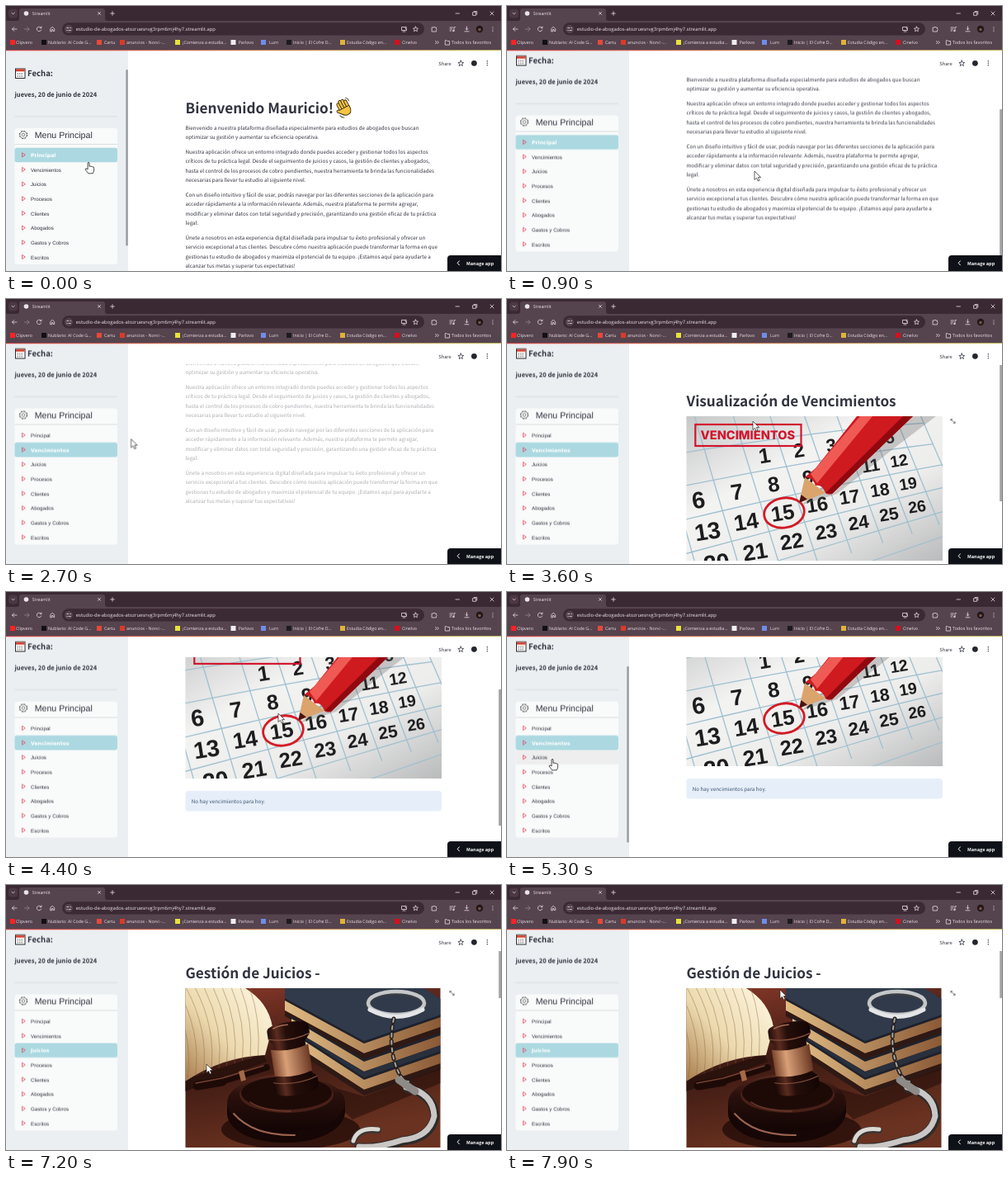
These frames come from a looping animation (600x321 px, 8 s). An HTML page:

```html
<!DOCTYPE html>
<html lang="es">
<head>
<meta charset="utf-8">
<title>Estudio de abogados</title>
<style>
html, body { margin: 0; width: 100%; height: 100%; overflow: hidden; background: #fff; }
svg { display: block; width: 100vw; height: 100vh; }
text { text-rendering: geometricPrecision; white-space: pre; }
.sans { font-family: "Noto Sans CJK JP", "Noto Sans CJK SC", "Noto Sans", sans-serif; fill: #31333f; font-size: 6.29px; }
.b { font-weight: 700; }
.h1 { font-size: 17.2px; font-weight: 700; }
.ui { font-family: "Open Sans", sans-serif; fill: #eee4e9; font-size: 5.25px; }
.menu { font-family: "Liberation Sans", Arial, sans-serif; fill: #31333f; font-size: 6.2px; }
.picked { font: 700 6.15px "DejaVu Sans", sans-serif; fill: #fff; }
.line { fill: none; stroke-linecap: round; stroke-linejoin: round; }

.move, .show { animation-duration: 8s; animation-iteration-count: infinite; animation-timing-function: linear; }
.show { animation-timing-function: step-end; }

#side { animation-name: side; }
@keyframes side { 0%, 1% { transform: none } 4%, 100% { transform: translateY(-15.5px) } }
#sideThumb { animation-name: sideThumb; }
@keyframes sideThumb { 0%, 1% { transform: none } 4%, 100% { transform: translateY(13px) } }
#sideBar { animation-name: sideBar; }
@keyframes sideBar { 0% { opacity: 1 } 5% { opacity: 0 } 15.5% { opacity: 1 } 32% { opacity: 0 } 61% { opacity: 1 } 74.5%, 100% { opacity: 0 } }

#sel0 { animation-name: sel0; }
@keyframes sel0 { 0% { opacity: 1 } 28%, 100% { opacity: 0 } }
#sel1 { animation-name: sel1; }
@keyframes sel1 { 0% { opacity: 0 } 28% { opacity: 1 } 70.5%, 100% { opacity: 0 } }
#sel2 { animation-name: sel2; }
@keyframes sel2 { 0% { opacity: 0 } 70.5%, 100% { opacity: 1 } }
#hover1 { animation-name: hover1; }
@keyframes hover1 { 0% { opacity: 0 } 23.5% { opacity: 1 } 28%, 100% { opacity: 0 } }
#hover2 { animation-name: hover2; }
@keyframes hover2 { 0% { opacity: 0 } 17.5% { opacity: 1 } 23.5% { opacity: 0 } 63.5% { opacity: 1 } 70.5%, 100% { opacity: 0 } }

#home { animation-name: home; }
@keyframes home { 0%, 29% { opacity: 1 } 32%, 34.99% { opacity: .4 } 35%, 100% { opacity: 0 } }
#homeScroll { animation-name: homeScroll; }
@keyframes homeScroll { 0%, 7.5% { transform: none } 12%, 100% { transform: translateY(-70px) } }
#due { animation-name: due; }
@keyframes due { 0%, 34.99% { opacity: 0 } 35%, 71.5% { opacity: 1 } 74%, 74.99% { opacity: .4 } 75%, 100% { opacity: 0 } }
#dueScroll { animation-name: dueScroll; }
@keyframes dueScroll { 0%, 48% { transform: none } 55% { transform: translateY(-91px) } 57%, 100% { transform: translateY(-106px) } }
#trial { animation-name: trial; }
@keyframes trial { 0% { opacity: 0 } 75%, 100% { opacity: 1 } }
#trialScroll { animation-name: trialScroll; }
@keyframes trialScroll { 0%, 80% { transform: none } 84%, 86.5% { transform: translateY(-88px) } 90%, 100% { transform: none } }

#homeBar { animation-name: homeBar; }
@keyframes homeBar { 0% { opacity: 0 } 6% { opacity: 1 } 15%, 100% { opacity: 0 } }
#homeThumb { animation-name: homeThumb; }
@keyframes homeThumb { 0%, 7.5% { transform: none } 12%, 100% { transform: translateY(54px) } }
#dueBar { animation-name: dueBar; }
@keyframes dueBar { 0% { opacity: 0 } 35% { opacity: 1 } 61%, 100% { opacity: 0 } }
#dueThumb { animation-name: dueThumb; }
@keyframes dueThumb { 0%, 48% { transform: none } 55% { transform: translateY(38px) } 57%, 100% { transform: translateY(44px) } }
#trialBar { animation-name: trialBar; }
@keyframes trialBar { 0% { opacity: 0 } 76%, 100% { opacity: 1 } }
#trialThumb { transform-origin: 0 80px; animation-name: trialThumb; }
@keyframes trialThumb { 0%, 80% { transform: scaleY(1.4) } 84%, 86.5% { transform: translateY(3px) scaleY(1.4) } 90%, 100% { transform: none } }
#dueZoom { animation-name: dueZoom; }
@keyframes dueZoom { 0% { opacity: 0 } 41.5% { opacity: 1 } 60%, 100% { opacity: 0 } }
#trialZoom { animation-name: trialZoom; }
@keyframes trialZoom { 0% { opacity: 0 } 78%, 100% { opacity: 1 } }

#cursor { animation-name: cursor; }
@keyframes cursor {
  0%, 3.5% { transform: translate(100px, 189px) }
  7.5%, 12% { transform: translate(300px, 200px) }
  17.5% { transform: translate(101px, 197px) }
  21.25% { transform: translate(96px, 189px) }
  25%, 29.5% { transform: translate(70px, 181px) }
  41% { transform: translate(290px, 150px) }
  45%, 48% { transform: translate(298px, 148px) }
  52%, 58.5% { transform: translate(330px, 147px) }
  65% { transform: translate(60px, 199px) }
  66.25%, 72% { transform: translate(55px, 202px) }
  79%, 91% { transform: translate(243px, 217px) }
  98.75%, 100% { transform: translate(331px, 127px) }
}
#hand { animation-name: hand; }
@keyframes hand { 0% { opacity: 1 } 4.4% { opacity: 0 } 16.7% { opacity: 1 } 31.5% { opacity: 0 } 63% { opacity: 1 } 73.5%, 100% { opacity: 0 } }
#arrow { animation-name: arrow; }
@keyframes arrow { 0% { opacity: 0 } 4.4% { opacity: 1 } 16.7% { opacity: 0 } 31.5% { opacity: 1 } 63% { opacity: 0 } 73.5%, 100% { opacity: 1 } }
</style>
</head>
<body>
<svg viewBox="0 0 600 321" preserveAspectRatio="none">
  <defs>
    <clipPath id="mainClip"><rect x="148" y="79.5" width="452" height="242"/></clipPath>
    <clipPath id="calClip"><rect x="217.5" y="142" width="310.5" height="175"/></clipPath>
    <clipPath id="lawClip"><rect x="217.5" y="125" width="309" height="193"/></clipPath>
    <linearGradient id="paper" x2="1" y2="1">
      <stop stop-color="#c6c7c8"/><stop offset=".35" stop-color="#f3f3f2"/>
      <stop offset=".65" stop-color="#ededec"/><stop offset="1" stop-color="#b9babb"/>
    </linearGradient>
    <linearGradient id="desk" x2=".3" y2="1">
      <stop stop-color="#8a3a2a"/><stop offset=".5" stop-color="#3d1a13"/><stop offset="1" stop-color="#6a3220"/>
    </linearGradient>
    <linearGradient id="leaf" y1="1" x2="1" y2="0">
      <stop stop-color="#a87c4c"/><stop offset=".45" stop-color="#ecd9ae"/><stop offset="1" stop-color="#fff8e4"/>
    </linearGradient>
    <linearGradient id="bookEdge"><stop stop-color="#e0bb84"/><stop offset="1" stop-color="#8a5a36"/></linearGradient>
    <linearGradient id="wood" x2="0" y2="1">
      <stop stop-color="#5a2a1e"/><stop offset=".35" stop-color="#29100c"/><stop offset="1" stop-color="#120504"/>
    </linearGradient>
    <linearGradient id="turned">
      <stop stop-color="#150605"/><stop offset=".25" stop-color="#5b2c20"/><stop offset=".45" stop-color="#250e0a"/><stop offset="1" stop-color="#120504"/>
    </linearGradient>
    <linearGradient id="brass">
      <stop stop-color="#7a452c"/><stop offset=".35" stop-color="#d9a077"/><stop offset="1" stop-color="#6a3824"/>
    </linearGradient>
    <linearGradient id="edge" x2="1"><stop stop-color="#ff4b4b"/><stop offset="1" stop-color="#fffd80"/></linearGradient>
    <path id="zoom" class="line" d="M-2.6-.6V-2.4H-.8M-2.4-2.2L2.4 2.2M2.6 .6V2.4H.8" stroke="#555" stroke-width=".8"/>
  </defs>

  <rect width="600" height="321" fill="#fff"/>

  <!-- Sidebar -->
  <rect y="53" width="148" height="268" fill="#ebeff2"/>
  <g id="side" class="move">
    <rect x="11.5" y="76" width="11.5" height="11.5" fill="#fff" stroke="#2b2b2b" stroke-width="1"/>
    <path d="M12 76.5h10.5v2.8h-10.5z" fill="#d8402f"/>
    <path d="M13.5 82h7.5M13.5 85h7.5" stroke="#777" stroke-width="1.3" stroke-dasharray="1.4 1"/>
    <text class="sans b" x="26" y="85" style="font-size:9.6px">Fecha:</text>
    <text class="sans b" x="10.5" y="110" style="font-size:7.6px">jueves, 20 de junio de 2024</text>
    <path d="M10.5 133.8H135" stroke="#d0d4da" stroke-width=".7"/>
    <rect x="10.5" y="148" width="124.5" height="165" rx="3.5" fill="#f9fafa"/>
    <path d="M10.5 167.5H135" stroke="#cfd3d6" stroke-width=".7"/>
    <circle cx="21" cy="156" r="4.7" fill="none" stroke="#444" stroke-width="1" stroke-dasharray="1.8 1.89"/>
    <circle cx="21" cy="156" r="4.2" fill="#f9fafa" stroke="#444" stroke-width=".6"/>
    <circle cx="21" cy="156" r="1.8" fill="none" stroke="#444" stroke-width=".6"/>
    <text class="menu" x="34.7" y="160" style="font-size:10.6px">Menu Principal</text>
    <g id="menu"></g>
  </g>
  <g id="sideBar" class="show">
    <rect id="sideThumb" class="move" x="145.3" y="77" width="2.5" height="213.5" rx="1.2" fill="#9a9da2"/>
  </g>

  <!-- Pages -->
  <g clip-path="url(#mainClip)">
    <g id="home" class="move"><g id="homeScroll" class="move">
      <text class="sans h1" x="217.5" y="130">Bienvenido Mauricio!</text>
      <g transform="translate(409.5 123.5) rotate(-28)" fill="#f6c443" stroke="#3b2d14" stroke-width=".9">
        <rect x="-6" y="-8.5" width="3.6" height="12" rx="1.8"/>
        <rect x="-2.8" y="-10.5" width="3.6" height="13" rx="1.8"/>
        <rect x=".4" y="-10" width="3.6" height="13" rx="1.8"/>
        <rect x="3.5" y="-8" width="3.4" height="11" rx="1.7"/>
        <path d="M-6 0H6.9V4Q6 9.5 1 9.5Q-3 9.5-6 5L-9.6 1Q-9.6-1.6-7.5-1Z"/>
        <path class="line" d="M9.5-5Q10-8 7.5-10M-8.5 6Q-8 9-5 10.5"/>
      </g>
      <g id="intro"></g>
    </g></g>

    <g id="due" class="move"><g id="dueScroll" class="move">
      <text class="sans h1" x="217.5" y="130">Visualización de Vencimientos</text>
      <g clip-path="url(#calClip)">
        <rect x="217" y="142" width="312" height="176" fill="url(#paper)"/>
        <g id="calendar"></g>
        <ellipse class="line" cx="336" cy="259" rx="24.5" ry="18" transform="rotate(-10 336 259)" stroke="#d51a25" stroke-width="2.8"/>
        <path d="M356 250L400 236L470 180L520 142H480Z" fill="#555" opacity=".28"/>
        <path d="M354 247L361 216L386 235Z" fill="#dba46c"/>
        <path d="M354 247L356.5 237L364 242.5Z" fill="#4a1414"/>
        <path d="M361 216L374 205L424 142H492L394 236Q389 238 386 235Q382 224 374 226Q370 215 361 216Z" fill="#cf1a20"/>
        <path d="M368 212L428 142H443L376 223Z" fill="#ef5a55"/>
        <path d="M386 235L480 142H492L394 236Z" fill="#90090f"/>
        <rect x="228.3" y="152" width="128.2" height="26" fill="none" stroke="#d2142d" stroke-width="2.2"/>
        <text x="234.5" y="170" font-family="Inter, sans-serif" font-weight="800" font-size="14.6" fill="#d2142d">VENCIMIENTOS</text>
      </g>
      <use id="dueZoom" class="show" href="#zoom" x="540.5" y="148"/>
      <rect x="217.5" y="332" width="310.5" height="24.5" rx="3.5" fill="#e6eff9"/>
      <text class="sans" x="224.7" y="346.5" style="fill:#39536f">No hay vencimientos para hoy.</text>
    </g></g>

    <g id="trial" class="show"><g id="trialScroll" class="move">
      <text class="sans h1" x="217.5" y="113">Gestión de Juicios -</text>
      <g clip-path="url(#lawClip)">
        <rect x="217" y="125" width="310" height="194" fill="url(#desk)"/>
        <path d="M217 236L312 205L316 214L217 250Z" fill="#2a120d"/>
        <path d="M217 125H290Q318 142 323 172L314 206Q262 208 217 238Z" fill="url(#leaf)"/>
        <g id="leaves" fill="none" stroke="#8a683c" stroke-width=".7" opacity=".65"></g>
        <path d="M338 125H506L527 138V158L434 190L338 137Z" fill="#303a4b"/>
        <g id="books"></g>
        <path d="M372 238L434 256L527 222V240L420 284Z" fill="#1c0a06" opacity=".5"/>
        <ellipse cx="345" cy="296" rx="84" ry="24" fill="#140504" opacity=".65"/>
        <path d="M268 264V278C274 324 404 324 411 276V262Z" fill="#160605"/>
        <ellipse cx="339.5" cy="264" rx="71.5" ry="35" fill="url(#wood)"/>
        <ellipse cx="340" cy="254" rx="57" ry="22" fill="#472018"/>
        <ellipse cx="340" cy="252" rx="55" ry="20" fill="#1d0a07"/>
        <path class="line" d="M276 277Q300 304 350 303" stroke="#9b6450" stroke-width="2"/>
        <path class="line" d="M296 263Q312 274 345 274" stroke="#6d3a2b" stroke-width="1.5"/>
        <path class="line" d="M232 243L262 238" stroke="#1d0a07" stroke-width="11"/>
        <path class="line" d="M258 239L316 221" stroke="#1d0a07" stroke-width="8"/>
        <path class="line" d="M230 240L262 234L312 219" stroke="#74402f" stroke-width="1.5"/>
        <path d="M282 226l6-2 3 12-6 2z" fill="#a46a47"/>
        <g transform="rotate(-9 346 212)">
          <path d="M322 174Q322 166 347 166T373 174V183L366 191V228L374 236V246Q372 255 347 255T320 246V236L327 228V191L322 183Z" fill="url(#turned)"/>
          <path d="M323 196Q346 203 369 196V228Q346 235 323 228Z" fill="url(#brass)"/>
          <path d="M322 183Q347 191 373 183M320 236Q347 244 374 236" fill="none" stroke="#84503c" stroke-width="1.2"/>
          <path class="line" d="M330 171Q338 168 348 169" stroke="#a36a54" stroke-width="1.6"/>
        </g>
        <g class="line">
          <ellipse cx="473" cy="144" rx="34" ry="14" stroke="#3c3e42" stroke-width="7"/>
          <ellipse cx="473" cy="143" rx="34" ry="14" stroke="#c4c7ca" stroke-width="4.5"/>
          <path d="M441 151Q473 168 505 151" stroke="#e4e5e6" stroke-width="5"/>
          <path d="M470 162Q464 190 471 214T488 238" stroke="#25201f" stroke-width="5" stroke-dasharray="4 5"/>
          <path d="M470 162Q464 190 471 214T488 238" stroke="#a9a39d" stroke-width="2" stroke-dasharray="4 5"/>
          <path d="M486 246Q519 254 520 281Q514 307 481 310Q450 320 428 318" stroke="#2f2b2a" stroke-width="11"/>
          <path d="M485 245Q518 252 519 280Q513 306 480 309Q450 319 428 317" stroke="#c9c8c6" stroke-width="7"/>
          <path d="M421 311Q426 294 451 297" stroke="#3a3534" stroke-width="8"/>
          <path d="M421 310Q426 293 451 296" stroke="#dbd8d2" stroke-width="5"/>
          <path d="M476 236L496 250" stroke="#8d8a87" stroke-width="9"/>
        </g>
      </g>
      <use id="trialZoom" class="show" href="#zoom" x="540.5" y="131"/>
      <text class="sans b" x="217.5" y="347" style="font-size:10.75px">Selecciona una Opcion</text>
      <circle cx="222" cy="363.5" r="2.6" fill="#fff" stroke="#f0393f" stroke-width="2.2"/>
      <g fill="#fff" stroke="#b9bbc1" stroke-width=".7"><circle cx="262" cy="363.5" r="3.4"/><circle cx="319.3" cy="363.5" r="3.4"/></g>
      <g class="sans"><text x="229" y="366">Juicios</text><text x="269" y="366">Crear Juicios</text><text x="326.3" y="366">Agregar Informacion</text></g>
      <path d="M217.5 390H528" stroke="#d5d6d9" stroke-width=".7"/>
    </g></g>
  </g>

  <!-- Page header -->
  <text class="sans" x="524.3" y="71.8" style="font-size:5.7px">Share</text>
  <path class="line" d="M551.3 66l1 2.3 2.4.2-1.9 1.6.6 2.4-2.1-1.3-2.1 1.3.6-2.4-1.9-1.6 2.4-.2z" stroke="#31333f" stroke-width=".8"/>
  <circle cx="567.4" cy="69.3" r="3.4" fill="#24262e"/>
  <path class="line" d="M583.3 66.8v0M583.3 69.3v0M583.3 71.8v0" stroke="#31333f" stroke-width="1.4"/>

  <g fill="#a3a4a7">
    <g id="homeBar" class="show"><rect id="homeThumb" class="move" x="597.2" y="80" width="2.8" height="187"/></g>
    <g id="dueBar" class="show"><rect id="dueThumb" class="move" x="597.2" y="80" width="2.8" height="165"/></g>
    <g id="trialBar" class="show"><rect id="trialThumb" class="move" x="597.2" y="80" width="2.8" height="57"/></g>
  </g>

  <path d="M535 321V306Q535 302 539 302H600V321Z" fill="#0e1117"/>
  <path class="line" d="M549.4 308.8L547.2 311.3L549.4 313.8" stroke="#fff" stroke-width="1"/>
  <text class="sans b" x="558" y="313.5" style="font-size:5.6px;fill:#fff">Manage app</text>

  <!-- Browser -->
  <rect y="53" width="600" height="1.3" fill="url(#edge)"/>
  <rect width="600" height="53.4" fill="#55434e"/>
  <rect width="600" height="18" fill="#3a2933"/>
  <path d="M13 18Q16 18 16 15V6Q16 3 19 3H117Q120 3 120 6V15Q120 18 123 18Z" fill="#55434e"/>
  <rect x="3" y="3.5" width="11" height="11" rx="3.5" fill="#4b3843"/>
  <circle cx="24.5" cy="9" r="2.8" fill="#e9e4e6"/>
  <text class="ui" x="31.7" y="11">Streamlit</text>
  <rect x="68" y="20.3" width="439" height="15.2" rx="7.6" fill="#3b2a34"/>
  <circle cx="76" cy="28" r="5" fill="#55434e"/>
  <text class="ui" x="84.8" y="30" style="font-size:5.87px">estudio-de-abogados-atozruesnvg3rpm6mj4hy7.streamlit.app</text>
  <g class="line" stroke="#e6dae0" stroke-width=".8">
    <path d="M7 8.2l1.7 1.7 1.7-1.7M111.5 7.4l3 3m0-3l-3 3M126.7 9h4.6M129 6.7v4.6"/>
    <path d="M545 9h4.5M566 7.7h3.6v3.6h-3.6zM567.2 6.5h3.6v3.6M587 7l4 4m0-4l-4 4"/>
    <path d="M13 28H7.5m2.3-2.4L7.5 28l2.3 2.4"/>
    <path d="M22.5 28H28m-2.3-2.4L28 28l-2.3 2.4" stroke="#96858e"/>
    <path d="M42.5 26.3A2.8 2.8 0 1 0 42.8 29M43 25v1.7h-1.8M53.7 30.5v-3l2.5-2.2 2.5 2.2v3h-1.7v-2h-1.6v2z"/>
    <path d="M73.8 26.5h2M78 26.5h.5M73.8 29.5h.5M76 29.5h2.4"/>
    <path d="M484 25.5h-4.5v4h6v-1.5M481 31h3M484.8 25v2.6m-1-.9l1 .9 1-.9"/>
    <path d="M496.5 25l.9 2 2.1.2-1.6 1.4.5 2.1-1.9-1.1-1.9 1.1.5-2.1-1.6-1.4 2.1-.2z"/>
    <path d="M516.5 26h1.6q.8-2 1.6 0h1.8v1.8q1.8.7 0 1.5v1.7h-5z"/>
    <path d="M538 26h3.6M538 28h2.6M538 30h1.6M543 30.2v-4.5h1.6"/><circle cx="542.2" cy="30" r=".8"/>
    <path d="M558.5 24.8v4m-1.6-1.5l1.6 1.6 1.6-1.6M556 30.8h5"/>
    <path d="M590 25.8v0M590 28v0M590 30.2v0" stroke-width="1.2"/>
    <path d="M520.5 42.5l1.5 1.6-1.5 1.6m2.4-3.2l1.5 1.6-1.5 1.6"/>
    <path d="M532.3 46.7v-5h2l.7.8h2.6v4.2z"/>
  </g>
  <circle cx="574" cy="28" r="4.2" fill="#20171a"/><circle cx="574" cy="28.6" r="1.8" fill="#7c5440"/>
  <g id="bookmarks" class="ui"></g>
  <text class="ui" x="540" y="46" style="font-size:5.5px">Todos los favoritos</text>

  <!-- Pointer -->
  <g id="cursor" class="move">
    <path id="arrow" class="show" d="M0 0V10.5L2.5 8.3L4.2 12L6 11.2L4.4 7.6H7.6Z" fill="#fff" stroke="#222" stroke-width=".7"/>
    <path id="hand" class="show" d="M-.9 9V1Q0-.6 1 1V5.4Q2.2 4.2 3 5.5Q4.2 4.6 4.9 6Q6.6 5.4 6.6 7.4V10Q6.3 12 5.2 13.8H-.2L-4 9Q-3.6 7.2-1.9 8.2Z" fill="#fff" stroke="#222" stroke-width=".8" stroke-linejoin="round"/>
  </g>
</svg>
<script>
const put = (id, parts) => { document.getElementById(id).innerHTML = parts.join(''); };
const range = (n, from = 0) => Array.from({ length: n }, (_, i) => i + from);

// Sidebar menu
const rowTop = r => 171.7 + 17.65 * r;
const items = ['Principal', 'Vencimientos', 'Juicios', 'Procesos', 'Clientes', 'Abogados', 'Gastos y Cobros', 'Escritos'];
const bar = (r, fill) => `<rect x="10.5" y="${rowTop(r)}" width="124.5" height="17.6" rx="2.6" fill="${fill}"/>`;
const label = (r, style) => `<text class="${style}" x="30" y="${rowTop(r) + 11.3}">${items[r]}</text>`;
const rows = range(items.length);
put('menu', [
  ...[1, 2].map(r => `<g id="hover${r}" class="show">${bar(r, '#eee')}</g>`),
  ...rows.map(r => label(r, 'menu')),
  ...[0, 1, 2].map(r => `<g id="sel${r}" class="show">${bar(r, '#acd9e1')}${label(r, 'picked')}</g>`),
  ...rows.map(r => `<path class="line" d="M19.6 ${rowTop(r) + 6.5}v4.8l3.4-2.4z" stroke="#e0405a" stroke-width=".8"/>`)
]);

// Welcome paragraphs
const paragraphs = [
  ['Bienvenido a nuestra plataforma diseñada especialmente para estudios de abogados que buscan',
   'optimizar su gestión y aumentar su eficiencia operativa.'],
  ['Nuestra aplicación ofrece un entorno integrado donde puedes acceder y gestionar todos los aspectos',
   'críticos de tu práctica legal. Desde el seguimiento de juicios y casos, la gestión de clientes y abogados,',
   'hasta el control de los procesos de cobro pendientes, nuestra herramienta te brinda las funcionalidades',
   'necesarias para llevar tu estudio al siguiente nivel.'],
  ['Con un diseño intuitivo y fácil de usar, podrás navegar por las diferentes secciones de la aplicación para',
   'acceder rápidamente a la información relevante. Además, nuestra plataforma te permite agregar,',
   'modificar y eliminar datos con total seguridad y precisión, garantizando una gestión eficaz de tu práctica',
   'legal.'],
  ['Únete a nosotros en esta experiencia digital diseñada para impulsar tu éxito profesional y ofrecer un',
   'servicio excepcional a tus clientes. Descubre cómo nuestra aplicación puede transformar la forma en que',
   'gestionas tu estudio de abogados y maximiza el potencial de tu equipo. ¡Estamos aquí para ayudarte a',
   'alcanzar tus metas y superar tus expectativas!']
];
let y = 149.6;
put('intro', paragraphs.flatMap(lines => {
  const out = lines.map((line, i) => `<text class="sans" x="217.5" y="${y + 11.24 * i}">${line}</text>`);
  y += 11.24 * lines.length + 7.03;
  return out;
}));

// Calendar sheet seen in perspective
const cell = (c, r) => [243 + 48 * c - 1.25 * c * c + 11 * r, 281 - 12 * c + .4 * c * c + r * (38 - 1.7 * c)];
const rule = pts => `<path d="M${pts.map(p => p.map(v => v.toFixed(1))).join('L')}" fill="none" stroke="#9fc0cf" stroke-width="1.3"/>`;
const days = range(28, 1).map(n => {
  const c = (n + 1) % 7, r = Math.floor((n + 1) / 7) - 2;
  const [x, cy] = cell(c, r), size = 28.5 - 1.5 * c;
  return `<text transform="translate(${x} ${cy}) rotate(-9)" y="${size * .36}" text-anchor="middle"
    font-family="Liberation Sans, Arial, sans-serif" font-weight="700" font-size="${size}" fill="#1d1d1f">${n}</text>`;
});
put('calendar', [
  ...range(6, -3).map(r => rule(range(10, -1).map(c => cell(c - .5, r + .5)))),
  ...range(9).map(c => rule(range(7, -4).map(r => cell(c - .5, r)))),
  ...days
]);

// Open book and stacked books
put('leaves', range(10).map(i => `<path d="M${220 + i * 9.5} ${234 - i * 3}Q${228 + i * 9} ${180 - i * 2} ${196 + i * 11} 124"/>`));
put('books', range(3).map(i => {
  const top = 137 + 22 * i, left = 338 + 8 * i;
  const band = (dy, h, fill) => `<path d="M${left} ${top + dy}L434 ${top + 52 + dy}L527 ${top + 20 + dy}v${h}L434 ${top + 52 + dy + h}L${left} ${top + dy + h}Z" fill="${fill}"/>`;
  return band(0, 3, '#1d222c') + band(3, 12, 'url(#bookEdge)') + band(15, 7, i % 2 ? '#28303e' : '#2f1914');
}));

// Bookmarks: icon x, text x, label, icon colour
put('bookmarks', [
  [5, 12, 'Clipvero', '#f22'], [43, 51, 'Nublario: AI Code G...', '#111'], [110, 119, 'Cartu', '#e5493a'],
  [138, 146, 'anuncios - Norvi -...', '#d93a2b'], [205, 214, '¡Comienza a estudia...', '#e8e23c'],
  [272.5, 281.7, 'Parlovo', '#eee'], [309, 319, 'Lurn', '#6f8de8'], [340, 348, 'Inicio | El Cofre D...', '#1c1c1c'],
  [405, 413, 'Estudia Código en...', '#e0b23a'], [471, 480, 'Cinelvo', '#d5101c']
].map(([ix, x, name, fill]) => `<rect x="${ix}" y="41" width="6" height="6" fill="${fill}"/><text x="${x}" y="46">${name}</text>`));
</script>
</body>
</html>
```
